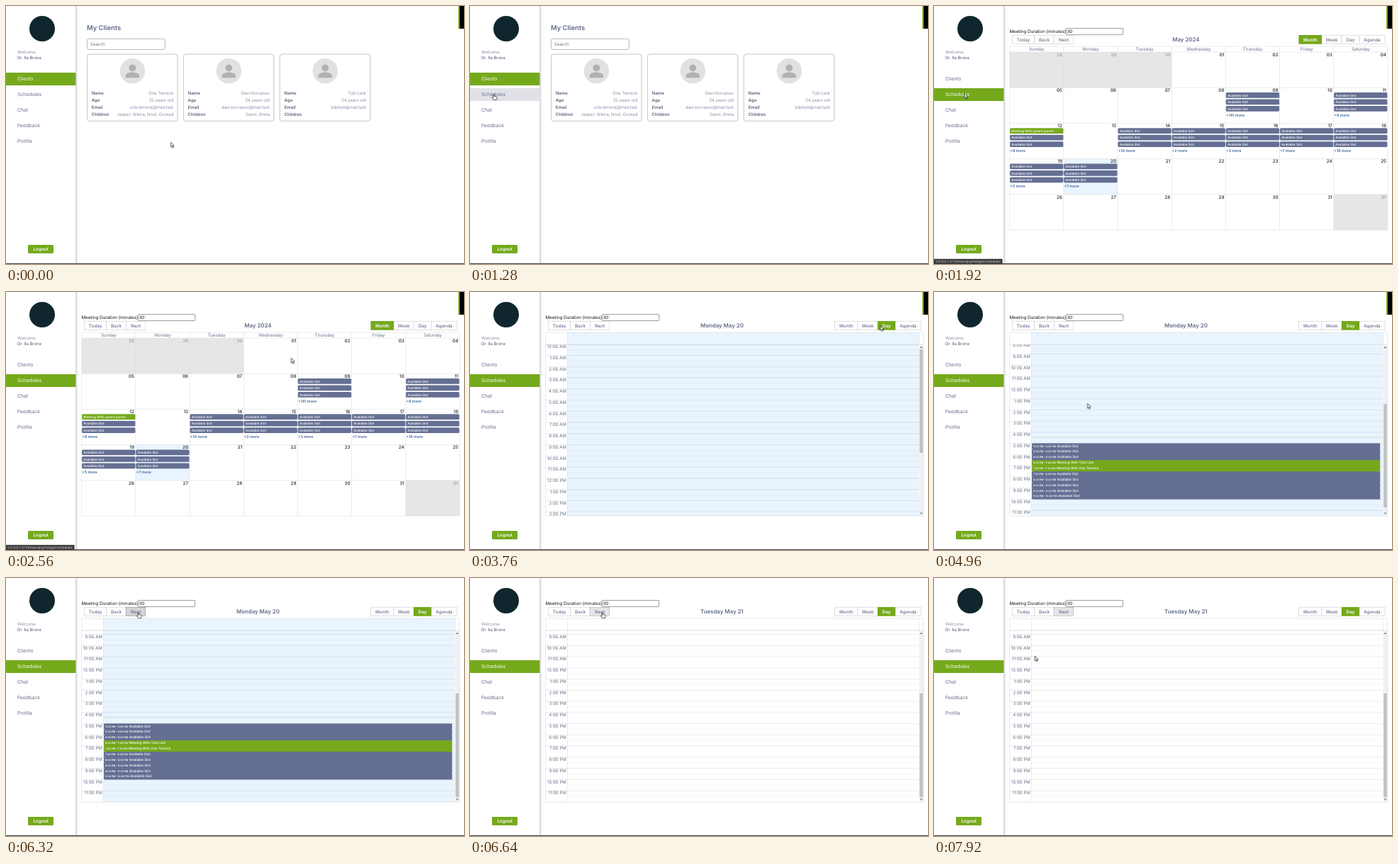
Write an HTML page that moves like this. It is 646 px wide and 364 px high and loops after 8000 ms.

```html
<!DOCTYPE html>
<html lang="en">
<head>
<meta charset="utf-8">
<title>Client schedules</title>
<style>
html, body { margin: 0; width: 100%; height: 100%; overflow: hidden; background: #fff; }
svg { display: block; width: 100vw; height: 100vh; font-family: Inter, "Open Sans", sans-serif; text-rendering: geometricPrecision; }
.anim { animation: 8s step-end infinite; }

/* pages */
.clients { animation-name: clients; }
.sched { animation-name: sched; }
.month { animation-name: month; }
.day { animation-name: day; }
.monday { animation-name: monday; }
.tuesday { animation-name: tuesday; }
@keyframes clients { 0% { opacity: 1 } 21%, 100% { opacity: 0 } }
@keyframes sched { 0% { opacity: 0 } 21%, 100% { opacity: 1 } }
@keyframes month { 0% { opacity: 0 } 21% { opacity: 1 } 45.5%, 100% { opacity: 0 } }
@keyframes day { 0% { opacity: 0 } 45.5%, 100% { opacity: 1 } }
@keyframes monday { 0% { opacity: 0 } 45.5% { opacity: 1 } 80%, 100% { opacity: 0 } }
@keyframes tuesday { 0% { opacity: 0 } 80%, 100% { opacity: 1 } }

/* sidebar, buttons, status line, corner */
.hover { animation-name: hover; }
.status { animation-name: status; }
.corner { animation-name: corner; }
.offText { animation-name: offText; }
.onText { animation-name: onText; }
.dayHover { animation-name: dayHover; }
.next { animation-name: next; }
@keyframes hover { 0% { opacity: 0 } 14% { opacity: 1 } 21%, 100% { opacity: 0 } }
@keyframes status { 0% { opacity: 0 } 18% { opacity: 1 } 35%, 100% { opacity: 0 } }
@keyframes corner { 0% { opacity: 1 } 72%, 100% { opacity: 0 } }
@keyframes offText { 0% { fill: #fff } 21%, 100% { fill: #666f8e } }
@keyframes onText { 0% { fill: #666f8e } 21%, 100% { fill: #fff } }
@keyframes dayHover { 0% { opacity: 0 } 42% { opacity: 1 } 45.5%, 100% { opacity: 0 } }
@keyframes next {
  0% { fill: #fff; stroke: #ccc }
  76.5% { fill: #e6e6e6; stroke: #adadad }
  78.5% { fill: #d4d4d4; stroke: #8c8c8c }
  80%, 100% { fill: #e6e6e6; stroke: #adadad }
}

/* scrolling */
.scroll { animation: scroll 8s linear infinite; }
.thumb { animation: thumb 8s linear infinite; }
@keyframes scroll {
  0%, 56.8% { transform: translateY(0) }
  62% { transform: translateY(-127.8px) }
  63%, 100% { transform: translateY(-136px) }
}
@keyframes thumb {
  0%, 56.8% { transform: translateY(0) }
  62% { transform: translateY(77px) }
  63%, 100% { transform: translateY(82px) }
}

/* pointer */
.cursor { animation: move 8s ease-in-out infinite; }
.arrow { animation-name: arrow; }
.hand { animation-name: hand; }
@keyframes move {
  0% { transform: translate(232.5px, 192.2px) }
  15%, 23% { transform: translate(33.5px, 124px) }
  32%, 33% { transform: translate(402.3px, 93.2px) }
  43%, 46% { transform: translate(587px, 45px) }
  55%, 56.5% { transform: translate(261.8px, 144.2px) }
  62%, 66.5% { transform: translate(216.5px, 157.2px) }
  77%, 84% { transform: translate(186.6px, 48.2px) }
  95% { transform: translate(144.5px, 129.5px); animation-timing-function: ease-out }
  99%, 100% { transform: translate(142.3px, 110px) }
}
@keyframes arrow {
  0% { opacity: 1 } 14% { opacity: 0 } 24% { opacity: 1 } 42% { opacity: 0 }
  47% { opacity: 1 } 76.5% { opacity: 0 } 85%, 100% { opacity: 1 }
}
@keyframes hand {
  0% { opacity: 0 } 14% { opacity: 1 } 24% { opacity: 0 } 42% { opacity: 1 }
  47% { opacity: 0 } 76.5% { opacity: 1 } 85%, 100% { opacity: 0 }
}
</style>
</head>
<body>
<svg id="stage" viewBox="0 0 646 364" preserveAspectRatio="none" xmlns="http://www.w3.org/2000/svg"></svg>
<script>
const GREEN = '#75a91c', SLATE = '#656f93', INK = '#666f8e', LINE = '#ddd', TODAY = '#e9f4fe';

const rect = (x, y, w, h, fill, more = '') =>
  `<rect x="${x}" y="${y}" width="${w}" height="${h}" fill="${fill}" ${more}/>`;
const line = (x1, y1, x2, y2, color = LINE, w = .6) =>
  `<path d="M${x1} ${y1}L${x2} ${y2}" stroke="${color}" stroke-width="${w}"/>`;
// text centred vertically on y
const text = (x, y, s, size, fill = INK, weight = 400, anchor = 'start', more = '') =>
  `<text x="${x}" y="${y + size * .36}" font-size="${size}" fill="${fill}" font-weight="${weight}" text-anchor="${anchor}" ${more}>${s}</text>`;
const group = (name, ...parts) => `<g class="anim ${name}">${parts.join('')}</g>`;
const range = n => [...Array(n).keys()];

function sidebar() {
  const items = ['Clients', 'Schedules', 'Chat', 'Feedback', 'Profile'];
  const anims = ['class="anim offText"', 'class="anim onText"'];
  return rect(98, 0, 2.4, 363, '#dcdce0') +
    '<circle cx="51" cy="32" r="18" fill="#10262e"/>' +
    text(16, 64.5, 'Welcome,', 5.9, INK, 300) +
    text(16, 72.7, 'Dr. Ila Brone', 5.9, '#4d5675') +
    group('clients', rect(0, 94, 98.4, 18, GREEN)) +
    group('hover', rect(0, 116, 98.4, 18, '#e1e2e7')) +
    group('sched', rect(0, 116, 98.4, 18, GREEN)) +
    items.map((s, i) => text(16, 102.8 + i * 22.05, s, 6.9, INK, 400, 'start', anims[i] || '')).join('') +
    rect(31, 337, 36, 12, GREEN, 'rx="1.4"') +
    text(49.2, 343, 'Logout', 6.3, '#fff', 600, 'middle');
}

function card(x, values) {
  const cx = x + 64;
  return rect(x, 68, 127.5, 94.3, '#fff', 'rx="3.5" stroke="#aaa" stroke-width=".7"') +
    `<circle cx="${cx}" cy="91.7" r="17.8" fill="#e1e1e2"/>
     <circle cx="${cx}" cy="87.3" r="4.9" fill="#b1b1b3"/>
     <path d="M${cx - 9.8} 101.3v-2.4c0-3.6 5-5.4 9.8-5.4s9.8 1.8 9.8 5.4v2.4z" fill="#b1b1b3"/>` +
    ['Name', 'Age', 'Email', 'Children'].map((s, i) =>
      text(x + 6.3, 122.5 + i * 10.25, s, 6.1, '#596380', 600) +
      text(x + 121.6, 122.5 + i * 10.25, values[i], 6, INK, 300, 'end')).join('');
}

function clientsPage() {
  return group('clients',
    text(114, 30.6, 'My Clients', 9.4, '#5f6885', 600),
    rect(114.4, 46.3, 109.8, 15.2, '#fff', 'rx="2.6" stroke="#999" stroke-width=".7"'),
    text(118.8, 54, 'Search', 6.3, '#777'),
    card(114.4, ['Orla Tennick', '32 years old', 'orla.tennick@mail.test', 'Jasper, Wilma, Noel, Conrad']),
    card(250.3, ['Davi Korvanez', '54 years old', 'davi.korvanez@mail.test', 'Samir, Greta']),
    card(386.2, ['Tobi Lark', '54 years old', 'tobilark@mail.test', '']));
}

const box = (x, w, fill = '#fff', more = '') =>
  rect(x, 41.2, w, 12.2, fill, `stroke="#ccc" stroke-width=".6" ${more}`);
const label = (x, w, s, fill = INK, weight = 450) => text(x + w / 2, 47.3, s, 6.35, fill, weight, 'middle');

function toolbar() {
  const left = [[110.5, 31.2, 'Today'], [141.7, 27.5, 'Back']];
  const right = [[514.5, 32.5, 'Month'], [547, 28, 'Week'], [575, 25, 'Day'], [600, 36, 'Agenda']];
  const button = ([x, w, s]) => box(x, w) + label(x, w, s);
  const active = ([x, w, s]) => rect(x, 41, w, 12.7, GREEN) + label(x, w, s, '#fff', 600);
  const title = s => text(355.4, 47.3, s, 7.85, '#626b88', 600, 'middle');
  return text(106.5, 36, 'Meeting Duration (minutes)', 6.2, '#111') +
    rect(186.3, 31.5, 80.3, 9, '#fff', 'stroke="#767676" stroke-width=".7" rx=".6"') +
    text(187.6, 36, '30', 6.1, '#111') +
    left.map(button).join('') + right.map(button).join('') +
    box(169.2, 27.6, '#fff', 'class="anim next"') + label(169.2, 27.6, 'Next') +
    group('dayHover', box(575, 25, '#e6e6e6'), label(575, 25, 'Day')) +
    group('month', active(right[0]), title('May 2024')) +
    group('day', active(right[2])) +
    group('monday', title('Monday May 20')) +
    group('tuesday', title('Tuesday May 21'));
}

function month() {
  const colW = 76.17, rowH = 50.2, x0 = 106.7, y0 = 65;
  const X = c => x0 + c * colW, Y = r => y0 + r * rowH;
  const days = ['Sunday', 'Monday', 'Tuesday', 'Wednesday', 'Thursday', 'Friday', 'Saturday'];
  // [row, column, hidden count]
  const busy = [[1, 4, 141], [1, 6, 8], [2, 0, 8], [2, 2, 14], [2, 3, 2], [2, 4, 3],
    [2, 5, 7], [2, 6, 16], [3, 0, 5], [3, 1, 7]];
  let s = rect(x0, y0, colW * 3, rowH, '#e6e6e6') + rect(X(6), Y(4), colW, rowH, '#e6e6e6') +
    rect(X(1), Y(3), colW, rowH, TODAY);
  s += range(6).map(r => line(x0, Y(r), 640, Y(r))).join('');
  s += range(8).map(c => line(X(c), 57, X(c), 316)).join('') + line(x0, 57, 640, 57);
  s += days.map((d, c) => text(X(c) + colW / 2, 61.2, d, 6.15, INK, 400, 'middle')).join('');
  s += range(35).map(i => {
    const d = i - 2, off = d < 1 || d > 31;
    const n = d < 1 ? d + 30 : d > 31 ? d - 31 : d;
    return text(X(i % 7 + 1) - 2, Y(i / 7 | 0) + 3.6, String(n).padStart(2, '0'), 6.3, off ? '#9a9a9a' : '#222', 450, 'end');
  }).join('');
  for (const [r, c, more] of busy) {
    s += range(3).map(i => {
      const y = Y(r) + 6.9 + i * 9.5, meet = r === 2 && c === 0 && i === 0;
      return rect(X(c) + .4, y, colW - .9, 7.7, meet ? GREEN : SLATE, 'rx="1.6"') +
        text(X(c) + 2.6, y + 3.9, meet ? 'Meeting With parent parent' : 'Available Slot', 4.55, '#fff', 500);
    }).join('');
    s += text(X(c) + .6, Y(r) + 38.4, `+${more} more`, 5.35, '#3a629f', 600);
  }
  return group('month', s);
}

function day() {
  const top = 73.8, hour = 15.75, Y = h => top + h * hour;
  const clock = h => `${((h | 0) + 11) % 12 + 1}:${h % 1 ? '30' : '00'} ${h < 12 ? 'AM' : 'PM'}`;
  const meetings = { 18.5: 'Tobi Lark', 19: 'Orla Tennick' };
  const grid = range(24).map(h =>
    line(107, Y(h), 633.5, Y(h), 'rgba(90,105,120,.24)') +
    line(137.5, Y(h + .5), 633.5, Y(h + .5), 'rgba(90,105,120,.09)') +
    text(135.8, Y(h) + 3.1, clock(h), 6.1, INK, 400, 'end')).join('');
  const slots = range(10).map(i => {
    const h = 17 + i / 2, who = meetings[h];
    return rect(138, Y(h), 491.3, hour / 2, who ? GREEN : SLATE, 'rx="1.2"') +
      `<text x="140" y="${Y(h) + 5}" fill="#fff" font-weight="600" font-size="3.5">${clock(h)} – ${clock(h + .5)}` +
      `<tspan dx="1.6" font-weight="500" font-size="4.7">${who ? 'Meeting With ' + who : 'Available Slot'}</tspan></text>`;
  }).join('');
  // solid backing keeps neighbouring slots joined
  const backing = rect(139, Y(17), 489, hour * 5, SLATE) + rect(139, Y(18.5), 489, hour, GREEN);
  return group('day',
    group('monday', rect(137.5, 57, 496, 259, TODAY)),
    `<g clip-path="url(#view)"><g class="scroll">${grid}`,
    group('monday', line(137.5, top + 258.5, 633.5, top + 258.5, '#bdd39d', .6), backing, slots),
    '</g></g>',
    line(107, 74, 640, 74, '#d5d5d5', .8),
    line(137.5, 57, 137.5, 316), line(633.5, 57, 633.5, 74),
    rect(633.5, 74.4, 6, 241.6, '#f1f1f1'),
    '<rect class="thumb" x="634.2" y="81" width="4.7" height="146" fill="#c1c1c1"/>',
    '<path d="M634.9 79l1.6-2 1.6 2zM634.9 311.4l1.6 2 1.6-2z" fill="#505050"/>',
    rect(106.7, 57, 533, 259, 'none', `stroke="${LINE}" stroke-width=".7"`));
}

function overlay() {
  return group('corner', rect(638, 0, 2, 32, GREEN), rect(640, 0, 6, 32, '#000')) +
    rect(0, 362.9, 646, 1.1, '#4a4a4a') +
    group('status', rect(0, 356.8, 96.6, 7.2, '#3b3b3b'),
      text(2, 360.6, '127.0.0.1:5173/main/psychologist/schedules', 4.45, '#eee', 400, 'start', 'font-family="Open Sans, sans-serif"'));
}

const cursor = `<g class="cursor" fill="#fff" stroke="#111" stroke-width=".7" stroke-linejoin="round">
  <path class="anim arrow" d="M0 0V6.8L1.5 5.4 2.6 7.9 3.7 7.4 2.7 5H4.8Z"/>
  <path class="anim hand" d="M-.7 .7Q0-.3 .7 .7V3.4L1.9 3.3 3 3.6 4 4Q4.5 4.2 4.4 5L3.8 8.6H0L-2.3 5.4Q-2.2 4.3-.7 5.4Z"/>
</g>`;

document.getElementById('stage').innerHTML =
  '<clipPath id="view"><rect x="106.7" y="74" width="533" height="242"/></clipPath>' +
  sidebar() + clientsPage() + group('sched', toolbar(), month(), day()) + overlay() + cursor;
</script>
</body>
</html>
```
